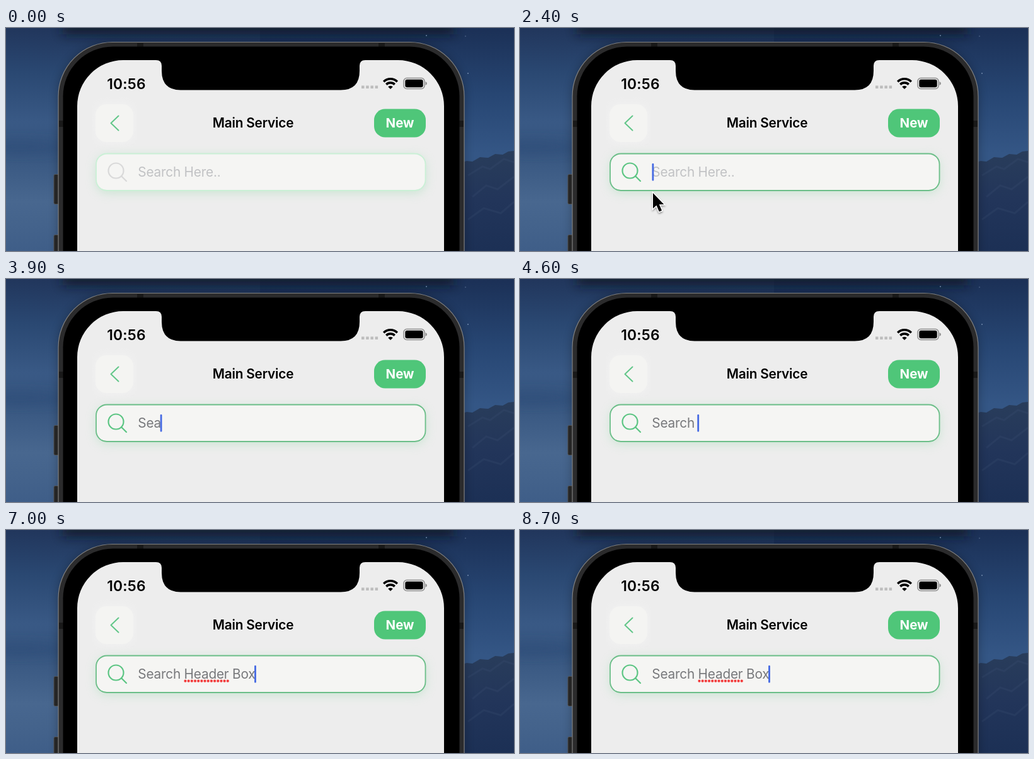
Animation, 806 px wide and 354 px high, one loop 8750 ms. Source, as an HTML page:

```html
<!DOCTYPE html>
<html lang="en">
<head>
<meta charset="utf-8">
<title>Search header</title>
<style>
html, body { margin: 0; width: 100%; height: 100%; overflow: hidden; background: #2a4a7a; }
svg { display: block; width: 806px; height: 354px; font-family: Inter, "Liberation Sans", sans-serif; }
text { white-space: pre; }
.bold { font-weight: 600; }
.field { font-size: 20.8px; letter-spacing: -.22px; }
</style>
</head>
<body>
<svg viewBox="0 0 806 354">
  <defs>
    <linearGradient id="skyLeft" x2="0" y2="1">
      <stop offset="0" stop-color="#21365c"/>
      <stop offset=".2" stop-color="#2a4872"/>
      <stop offset=".42" stop-color="#395985"/>
      <stop offset=".55" stop-color="#36557f"/>
      <stop offset=".78" stop-color="#48678f"/>
      <stop offset="1" stop-color="#3f5e88"/>
    </linearGradient>
    <linearGradient id="skyRight" x2="0" y2="1">
      <stop offset="0" stop-color="#1b3056"/>
      <stop offset=".3" stop-color="#274673"/>
      <stop offset=".56" stop-color="#345685"/>
    </linearGradient>
    <linearGradient id="rock" x2="0" y2="1">
      <stop offset="0" stop-color="#293d5b"/>
      <stop offset=".5" stop-color="#22355a"/>
      <stop offset="1" stop-color="#1c3055"/>
    </linearGradient>
    <filter id="soft" x="-30%" y="-100%" width="160%" height="300%"><feGaussianBlur stdDeviation="9"/></filter>
    <filter id="glow" x="-10%" y="-60%" width="120%" height="220%"><feGaussianBlur stdDeviation="8"/></filter>
    <filter id="drop" x="-50%" y="-50%" width="200%" height="200%">
      <feDropShadow dx="0" dy="2" stdDeviation="1.5" flood-opacity=".4"/>
    </filter>
  </defs>

  <!-- wallpaper -->
  <rect width="403" height="354" fill="url(#skyLeft)"/>
  <rect x="403" width="403" height="354" fill="url(#skyRight)"/>
  <ellipse cx="20" cy="188" rx="80" ry="9" fill="#2c4a76" opacity=".5" filter="url(#soft)"/>
  <rect x="90" y="-16" width="620" height="26" fill="#0a1224" opacity=".75" filter="url(#soft)"/>
  <g fill="#a9bedd" opacity=".6">
    <circle cx="733" cy="72" r="1"/><circle cx="667" cy="12" r="1"/><circle cx="729" cy="13" r=".7"/>
  </g>
  <path d="M715 216L731 211L740 212L752 205L765 206L776 200L788 201L797 196L806 195V354H715Z" fill="url(#rock)"/>
  <path d="M733 234L756 220L768 224L790 208L806 213M740 268L762 250L780 256L806 236M733 304L758 286L785 294L806 276"
        fill="none" stroke="#40587a" stroke-width="3" opacity=".2"/>

  <!-- phone -->
  <rect x="83" y="24" width="644" height="500" rx="86" opacity=".3" filter="url(#glow)"/>
  <g fill="#252525" stroke="#505050">
    <rect x="76" y="232.5" width="12" height="47" rx="2"/>
    <rect x="76" y="328.5" width="12" height="47" rx="2"/>
  </g>
  <rect x="83" y="22.5" width="644" height="500" rx="86" fill="#2b2b2c" stroke="#808080" stroke-width="1.2"/>
  <path d="M208 24h10v7h-10zM591 24h10v7h-10zM84 147h7v10h-7zM719 147h7v10h-7z" fill="#191919"/>
  <rect x="90.5" y="29.5" width="629" height="500" rx="79"/>
  <path d="M113 354V124A73 73 0 0 1 186 51H238Q247 51 247 60V68Q247 98.500 277 98.500H531Q561 98.500 561 68V60Q561 51 570 51H622A73 73 0 0 1 695 124V354Z" fill="#ededed"/>

  <!-- status bar -->
  <text class="bold" x="191" y="96.500" font-size="22.800" letter-spacing=".2" text-anchor="middle">10:56</text>
  <path d="M564 91.500h4.500v4.500h-4.500zm7.200 0h4.500v4.500h-4.500zm7.200 0h4.500v4.500h-4.500zm7.200 0h4.500v4.500h-4.500z" fill="#bdbdbd"/>
  <g fill="none" stroke="#000" stroke-width="3.600">
    <path d="M599.200 85.200a15.300 15.300 0 0 1 21.600 0M603.300 89.600a9.500 9.500 0 0 1 13.400 0"/>
    <path d="M610 97l-3.800-3.800a5.400 5.400 0 0 1 7.600 0z" fill="#000" stroke="none"/>
  </g>
  <rect x="631" y="79.500" width="33" height="17" rx="5" fill="none" stroke="#8e8e8e" stroke-width="1.500"/>
  <rect x="633.300" y="81.800" width="28.400" height="12.400" rx="3"/>
  <path d="M665.500 85q2.500 1 2.500 3t-2.500 3z" fill="#8e8e8e"/>

  <!-- header -->
  <rect x="142" y="121" width="60" height="60" rx="17" fill="#fff" opacity=".3" filter="url(#glow)"/>
  <rect x="142" y="121" width="60" height="60" rx="17" fill="#f4f4f2"/>
  <path d="M178.500 139.500L166.500 151L178.500 162.500" fill="none" stroke="#62c689" stroke-width="2" stroke-linecap="round" stroke-linejoin="round"/>
  <text class="bold" x="392" y="158" font-size="20.800" letter-spacing="-.2" text-anchor="middle">Main Service</text>
  <rect x="584" y="128.500" width="82" height="45" rx="17.500" fill="#4fc679"/>
  <text x="625" y="158" font-size="20.500" font-weight="700" fill="#fff" text-anchor="middle">New</text>

  <!-- search field -->
  <rect x="143" y="203" width="523" height="59" rx="17" fill="#a8dcb9" opacity=".5" filter="url(#glow)"/>
  <rect id="box" x="143" y="199.500" width="522.500" height="58.500" rx="17" fill="#f5f5f3" stroke-width="1.800"/>
  <g id="lens" fill="none" stroke-width="2.200" stroke-linecap="round">
    <circle cx="174.500" cy="226.500" r="12"/><path d="M183.500 235.500L191 243"/>
  </g>
  <text id="hint" class="field" x="209.300" y="236" fill="#c1c2c4">Search Here..</text>
  <text id="typed" class="field" x="209.300" y="236" fill="#77787b" xml:space="preserve"></text>
  <path id="squiggle" d="M284.500 239.700H352" stroke="#f33b3b" stroke-width="4.200" stroke-linecap="round" stroke-dasharray="0 5.180"/>
  <rect id="caret" y="215" width="2.800" height="27.500" rx="1" fill="#4469e3"/>

  <path id="arrow" d="M1 1V25.500L6.500 20.500L10.800 30.500L15 28.700L10.800 19H18.300Z" stroke="#fff" stroke-width="2.600" paint-order="stroke" filter="url(#drop)"/>
</svg>
<script>
const LOOP = 8750, PHRASE = 'Search Header Box';
// when each letter of the phrase arrives
const KEYS = [3100, 3550, 3700, 3950, 4100, 4400, 4600, 4950, 5250, 5275, 5300, 5500, 5550, 5700, 6000, 6250, 6550];
const FOCUS = [[1850, 0], [2200, 1]];
const CARET = [[1950, 0], [2100, 1], [7020, 1], [7350, 0], [7580, 0], [7730, 1],
               [7970, 1], [8350, 0], [8530, 0], [8690, 1]];
const ARROW_X = [[850, 236], [1200, 220], [2050, 220], [2400, 210], [2550, 210], [2850, 206]];
const ARROW_Y = [[850, 295], [1200, 229], [2050, 229], [2400, 261], [2550, 261], [2850, 360]];
const $ = id => document.getElementById(id);
const [box, lens, hint, typed, squiggle, caret, arrow] =
  ['box', 'lens', 'hint', 'typed', 'squiggle', 'caret', 'arrow'].map($);

function track(points, t) {
  const i = points.findIndex(p => p[0] > t);
  if (i < 0) return points[points.length - 1][1];
  if (!i) return points[0][1];
  const [t0, a] = points[i - 1], [t1, b] = points[i];
  const k = (t - t0) / (t1 - t0);
  return a + (b - a) * k * k * (3 - 2 * k);
}

const mix = (a, b, k) => `rgb(${a.map((v, i) => v + (b[i] - v) * k)})`;
const show = (el, on) => el.setAttribute('visibility', on ? 'visible' : 'hidden');

function draw(t) {
  const focus = track(FOCUS, t);
  box.setAttribute('stroke', mix([202, 240, 214], [107, 190, 136], focus));
  lens.setAttribute('stroke', mix([217, 217, 217], [92, 197, 131], focus));

  const count = KEYS.filter(k => k <= t).length;
  typed.textContent = PHRASE.slice(0, count);
  show(hint, !count);
  show(squiggle, t >= 5700);
  caret.setAttribute('x', 209.5 + (count ? typed.getComputedTextLength() - 1.5 : 0));
  caret.setAttribute('opacity', track(CARET, t));

  show(arrow, t >= 850 && t < 2850);
  arrow.setAttribute('transform', `translate(${track(ARROW_X, t)} ${track(ARROW_Y, t)})`);
}

const start = performance.now();
function tick() {
  draw((performance.now() - start) % LOOP);
  requestAnimationFrame(tick);
}
tick();
</script>
</body>
</html>
```
